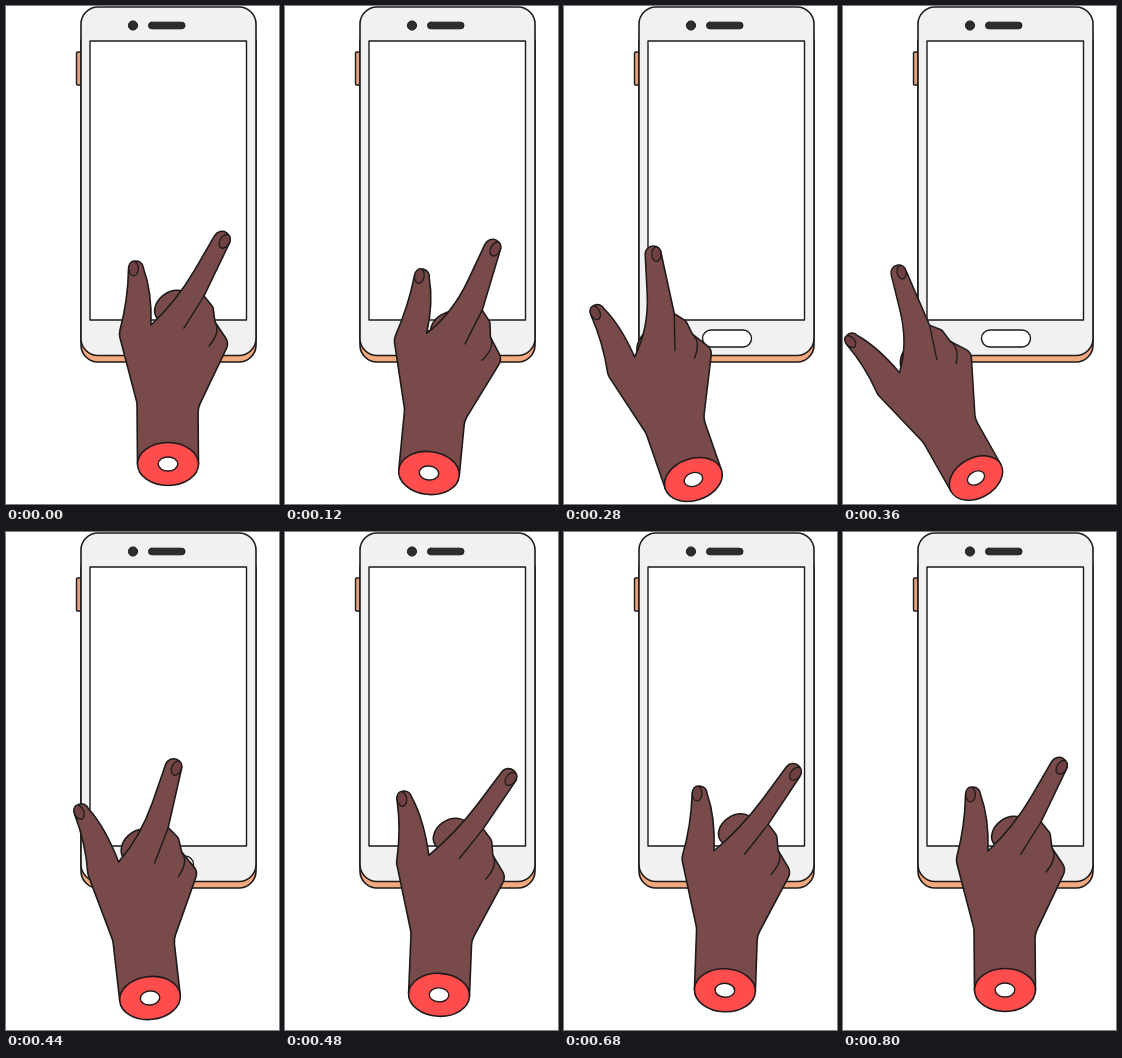
An HTML page with a canvas for the animation above (1920 ms loop, 273 px wide and 498 px high).

```html
<!DOCTYPE html>
<html lang="en">
<head>
<meta charset="utf-8">
<title>Hand swiping a phone</title>
<style>
  html, body { margin: 0; width: 100%; height: 100%; overflow: hidden; background: #fff; }
  canvas { display: block; }
</style>
</head>
<body>
<canvas id="stage" width="273" height="498"></canvas>
<script>
const ctx = document.getElementById('stage').getContext('2d');
const LOOP = 1920, STEP = 40;
const INK = '#1d1a1a', SKIN = '#794a4a', NAIL = '#704143', PEACH = '#f2a980';

// Time, wrist x and y, then degrees: turn of the hand, thumb and index relative to it
const keys = [
  [0, 162, 458, 0, 0, 32],
  [120, 144, 467, 6, 4, 21],
  [200, 130, 473, -3, 0, 20],
  [360, 133, 472, -29, -12, 17],
  [440, 144, 466, -6, -16, 27],
  [520, 163, 460, 9, -6, 44],
  [560, 160, 459, 7, -5, 42],
  [800, 162, 458, 0, 0, 32],
];
const end = keys.length - 1;

// Speed of one value at a key; the hand is at rest at both ends
function slope(k, i) {
  if (k === 0 || k === end) return 0;
  const a = keys[k - 1], b = keys[k + 1];
  return (b[i] - a[i]) / (b[0] - a[0]);
}

function poseAt(t) {
  if (t >= keys[end][0]) return keys[end];
  const k = keys.findIndex(key => key[0] > t) - 1;
  const a = keys[k], b = keys[k + 1];
  const span = b[0] - a[0], u = (t - a[0]) / span, v = 1 - u;
  return a.map((p, i) =>
    p * (1 + 2 * u) * v * v + b[i] * u * u * (3 - 2 * u) +
    span * u * v * (v * slope(k, i) - u * slope(k + 1, i)));
}

const rad = deg => deg * Math.PI / 180;

function paint(fill, width = 1.6) {
  if (fill) {
    ctx.fillStyle = fill;
    ctx.fill();
  }
  ctx.lineWidth = width;
  ctx.stroke();
}

function box(x, y, w, h, r, fill, width) {
  ctx.beginPath();
  ctx.roundRect(x, y, w, h, r);
  paint(fill, width);
}

function oval(x, y, rx, ry, angle, fill, width) {
  ctx.beginPath();
  ctx.ellipse(x, y, rx, ry, angle, 0, Math.PI * 2);
  paint(fill, width);
}

function drawPhone() {
  box(70.5, 46, 6, 33, 1, '#e6a07c', 1.4);
  box(75, 20, 175, 336, 17, PEACH);
  box(75, 1, 175, 348.5, 17, '#f1f1f1');
  box(84, 35, 156.5, 279, 0, '#fff', 1.4);
  oval(127, 19.5, 4.6, 4.6, 0, '#2e2c2c', 1);
  box(142.5, 16.2, 36.5, 6.6, 3.3, '#2e2c2c', 1);
  box(138.5, 324, 49, 17, 8.5, '#fff', 1.4);
}

// A point on a finger: distance along it and offset to its right
const finger = (x, y, angle) => (along, across) => [
  x + Math.sin(angle) * along + Math.cos(angle) * across,
  y - Math.cos(angle) * along + Math.sin(angle) * across,
];

// Drawn with the wrist at the origin and the fingers pointing up
function drawHand([, x, y, turn, thumbTurn, indexTurn]) {
  const size = 1 - turn * turn / 12000;   // foreshortening
  const ta = rad(thumbTurn), ia = rad(indexTurn);
  const thumb = finger(-33, -134.5, ta);
  const index = finger(10, -154, ia);
  const web = [-17, -139], base = [36, -168];

  ctx.save();
  ctx.translate(x, y);
  ctx.rotate(rad(turn));
  ctx.scale(size, size);

  // Folded finger behind the index
  oval(4, -129 - .9 * indexTurn, 19, 14, -.65, SKIN);

  ctx.beginPath();
  ctx.moveTo(-30.5, 0);
  ctx.arcTo(-31, -61, -49, -130, 20);
  ctx.arcTo(-49, -130, ...thumb(30, -7), 14);
  ctx.quadraticCurveTo(...thumb(30, -7), ...thumb(60, -6.5));
  ctx.arc(...thumb(61, 1), 7.5, ta + Math.PI, ta);
  ctx.quadraticCurveTo(...thumb(38, 17), ...web);
  ctx.quadraticCurveTo(...index(6, -6), ...index(42, -7));
  ctx.arc(...index(83, 0), 8.3, ia + Math.PI, ia);
  ctx.lineTo(...base);
  ctx.arcTo(45, -157, 47, -142, 6);
  ctx.arcTo(47, -142, 61, -121, 6);
  ctx.arcTo(61, -121, 30, -56, 11);
  ctx.arcTo(30, -56, 30.5, 0, 20);
  ctx.lineTo(30.5, 0);
  paint(SKIN);

  // Creases below the index and middle fingers
  const fold = finger(...base, ia);
  ctx.beginPath();
  ctx.moveTo(...base);
  ctx.lineTo(...fold(-38, 0));
  ctx.moveTo(47, -142);
  ctx.quadraticCurveTo(53, -132, 41, -118);
  paint(null, 1.4);

  oval(...thumb(61, -1.5), 4.8, 7.4, ta, NAIL, 1.3);
  oval(...index(83, 3.2), 4.8, 7.4, ia, NAIL, 1.3);

  oval(0, 0, 30.5, 21.5, 0, '#ff4d4d');
  oval(0, 0, 9.8, 7, 0, '#fff', 1.4);
  ctx.restore();
}

function frame(now) {
  const t = Math.floor(now % LOOP / STEP) * STEP;
  ctx.fillStyle = '#fff';
  ctx.fillRect(0, 0, 273, 498);
  ctx.strokeStyle = INK;
  ctx.lineJoin = ctx.lineCap = 'round';
  drawPhone();
  drawHand(poseAt(t));
  requestAnimationFrame(frame);
}
frame(performance.now());
</script>
</body>
</html>
```
